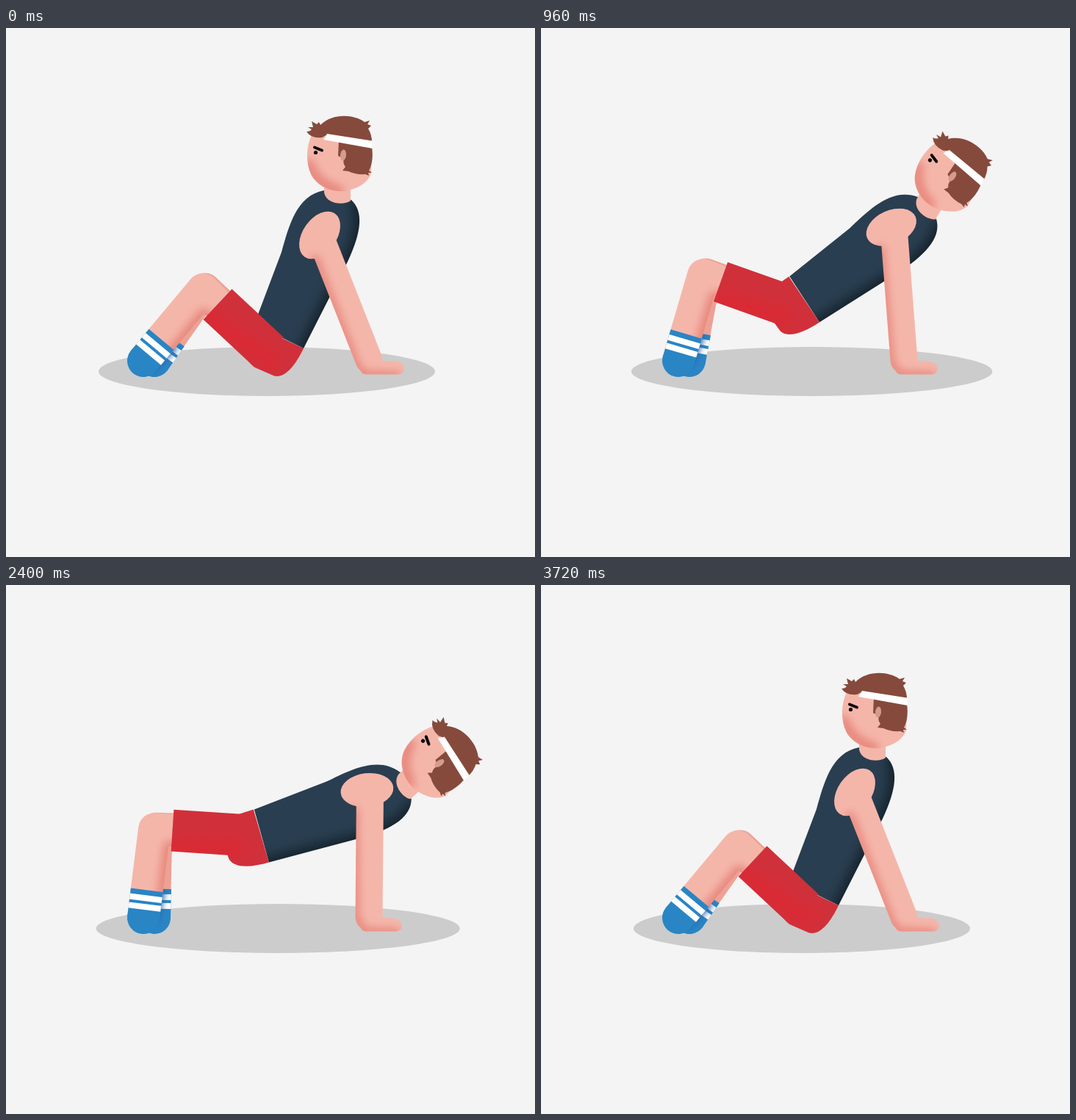
These frames come from a looping animation (720x720 px, 3800 ms). An HTML page with a canvas:

```html
<!DOCTYPE html>
<html>
<head>
<meta charset="utf-8">
<title>Bridge exercise</title>
<style>
html, body { margin: 0; width: 100%; height: 100%; overflow: hidden; background: #f4f4f4; }
canvas { display: block; }
</style>
</head>
<body>
<canvas id="stage" width="720" height="720"></canvas>
<script>
const LOOP = 3800, SWING = 1680, DEG = Math.PI / 180;
const SKIN = '#f5b6aa', BLUSH = '#e8877c', FAR_SKIN = '#eda195', BLUE = '#2985c4', NAVY = '#2a63a8';
const RED = '#d0303a', BRIGHT_RED = '#dc2833', HAIR = '#864a3c', WHITE = '#ffffff', INK = '#0c0808';
const screen2d = document.getElementById('stage').getContext('2d');
const layer = Object.assign(document.createElement('canvas'), { width: 720, height: 720 });
const g = layer.getContext('2d');

// Upper body in its sitting position; it turns as one piece around WAIST.
const WAIST = [405, 436];
const shirt = new Path2D('M338 403 L375 305 C385 270 395 228 433 221 L470 234 C487 250 484 278 465 318 L405 436Z');
const shirtBack = new Path2D('M486 240 C492 262 488 290 470 325 L410 444');
const neck = new Path2D('M433 205 V224 C436 240 460 242 469 235 V205Z');
const face = new Path2D('M416 146 C408 162 408 184 415 199 C423 215 442 224 461 222 C480 219 494 209 497 197 L498 150Z');
const jaw = new Path2D('M412 186 C418 204 432 216 452 222');
const hairTop = new Path2D('M436 146 L430 149 Q416 151 409 141 Q414 141 416 138 L411 135 L418 135 L416 127 L423 131 L426 128 L428 132 C444 116 473 117 488 128 L495 126 L492 131 L497 133 L493 137 Q498 145 498 156Z');
const hairBack = new Path2D('M453 152 L498 162 C500 176 498 187 494 194 L498 197 L493 197 L494 201 L489 199 Q476 200 466 195 L458 194 L462 189 Q458 184 460 178 L452 174Z');
const band = new Path2D('M437 144 L498 153.5 L499 164 L432 152Z');
const pelvis = new Path2D('M0 0 H-75 L-74 36 Q-60 52 -45 52 L-20 51 C-5 48 0 25 0 0Z');

const clamp = x => Math.min(1, Math.max(0, x));

// Symmetric cubic Bezier ease with handles of length a.
function ease(x, a) {
  let lo = 0, hi = 1, s = 0.5;
  for (let i = 0; i < 24; i++) {
    s = (lo + hi) / 2;
    const at = 3 * a * s * (1 - s) ** 2 + 3 * (1 - a) * s * s * (1 - s) + s ** 3;
    if (at < x) lo = s; else hi = s;
  }
  return s * s * (3 - 2 * s);
}

const swing = (t, up, down, a) => t < down
  ? ease(clamp((t - up) / SWING), a)
  : 1 - ease(clamp((t - down) / SWING), a);

const add = (p, q, k = 1) => [p[0] + q[0] * k, p[1] + q[1] * k];
const polar = angle => [Math.cos(angle), Math.sin(angle)];
function unit(from, to) {
  const x = to[0] - from[0], y = to[1] - from[1], d = Math.hypot(x, y);
  return [x / d, y / d];
}

function fill(path, color) {
  g.fillStyle = color;
  g.fill(path);
}

function stroke(path, width, color) {
  g.lineWidth = width;
  g.strokeStyle = color;
  g.stroke(path);
}

function line(points, width, color, cap = 'round') {
  const path = new Path2D();
  points.forEach(p => path.lineTo(...p));
  g.lineCap = cap;
  g.lineJoin = 'round';
  stroke(path, width, color);
}

function ellipse(x, y, rx, ry, angle, color) {
  g.fillStyle = color;
  g.beginPath();
  g.ellipse(x, y, rx, ry, angle, 0, 7);
  g.fill();
}

function at([x, y], angle, draw) {
  g.save();
  g.translate(x, y);
  g.rotate(angle);
  draw();
  g.restore();
}

// Draws a shape, then a blurred shade that stays inside it.
function part(base, shade, blur = 6) {
  g.clearRect(0, 0, 720, 720);
  base();
  if (shade) {
    g.save();
    g.globalCompositeOperation = 'source-atop';
    g.filter = `blur(${blur}px)`;
    shade();
    g.restore();
  }
  screen2d.drawImage(layer, 0, 0);
}

function sock(ankle, knee, height) {
  const up = unit(ankle, knee);
  at(ankle, Math.atan2(up[0], -up[1]), () => {
    ellipse(0, 0, 22, 22, 0, BLUE);
    g.fillRect(-22, -height, 44, height + 1);
    g.fillStyle = WHITE;
    g.fillRect(-22, 7 - height, 44, 8);
    g.fillRect(-22, 19 - height, 44, 8);
  });
}

function drawHead() {
  fill(hairBack, HAIR);
  ellipse(459, 173, 4, 7.5, 0.1, '#d59c8c');
  fill(hairTop, HAIR);
  fill(band, WHITE);
  line([[420, 162.5], [430, 166.5]], 4, INK);
  ellipse(421.5, 169.5, 2.6, 2.6, 0, INK);
}

function draw(t) {
  const u = swing(t, 120, 1800, 0.58), spread = swing(t, 0, 1760, 0.33);
  const mix = (from, to, bow = 0) => from + (to - from) * u + bow * u * (1 - u);

  const waist = [mix(405, 340, 26), mix(436, 360, 10)];
  const lean = mix(0, 60.5, 2) * DEG;
  const hem = [mix(288, 217, -32), mix(376, 329, -28)];
  const thighDir = polar(mix(43, -8.4, 9) * DEG);
  const thighDown = [-thighDir[1], thighDir[0]];
  const knee = [mix(268, 192, -35), mix(356, 333, -34)];
  const ankle = [187, 453], farAnkle = [202, 453], farKnee = add(knee, [3, -1]);
  const inBody = draw => at(waist, lean, () => { g.translate(-WAIST[0], -WAIST[1]); draw(); });
  const turned = (x, y, angle) => {
    const [c, s] = polar(angle);
    return add(waist, [x * c - y * s, x * s + y * c]);
  };

  screen2d.fillStyle = '#f4f4f4';
  screen2d.fillRect(0, 0, 720, 720);

  part(() => {
    const left = 126 - 5 * spread, right = 584 + 50 * spread;
    ellipse((left + right) / 2, 467.5, (right - left) / 2, 33.5, 0, '#cccccc');
  });

  // Legs
  const shin = unit(knee, ankle), calf = [shin[1], -shin[0]];
  const bend = add(add(knee, shin, 23), unit(knee, hem), 23);
  part(() => line([farAnkle, farKnee, add(hem, [3, -2])], 43, FAR_SKIN));
  part(
    () => sock(farAnkle, farKnee, 39.5),
    () => line([add(ankle, calf, 16), add(add(ankle, calf, 20), shin, -40)], 10, NAVY),
    4
  );
  part(
    () => line([add(ankle, shin, -20), knee, hem], 44, SKIN),
    () => line([add(ankle, calf, 23), bend, add(bend, thighDir, 30)], 17, BLUSH)
  );
  part(() => sock(ankle, knee, 38));

  // Torso and head
  part(
    () => inBody(() => fill(shirt, '#293e50')),
    () => inBody(() => stroke(shirtBack, 30, '#14212a')),
    8
  );
  part(() => inBody(() => fill(neck, SKIN)));
  part(
    () => inBody(() => fill(face, SKIN)),
    () => inBody(() => stroke(jaw, 16, BLUSH)),
    6
  );
  part(() => inBody(drawHead));

  // Shorts
  const hip = lean + 25.5 * DEG;
  part(
    () => {
      at(waist, hip, () => fill(pelvis, RED));
      line([hem, add(hem, thighDir, 96)], 57, RED, 'butt');
    },
    () => line([add(hem, thighDown, 22), turned(-30, 34, hip)], 20, BRIGHT_RED),
    9
  );

  // Arm
  const shoulder = turned(22 - 8 * u, -154 - 14 * u, lean);
  const wrist = [494, 452], armDir = unit(shoulder, wrist);
  const outer = [-armDir[1], armDir[0]];
  part(
    () => {
      line([add(shoulder, [4, 10]), wrist], 37, SKIN);
      line([[490, 463.5], [mix(534, 530), 463.5]], 16, SKIN);
      line([[512, 458], [mix(533, 526), 458.5]], 10, SKIN);
      ellipse(...shoulder, 36, 23, lean - 55 * DEG, SKIN);
    },
    () => line([add(add(shoulder, armDir, 28), outer, 18), add(wrist, outer, 19), [486, 472], [532, 474]], 12, BLUSH),
    6
  );
}

function frame() {
  const t = performance.now() % LOOP;
  draw(Math.floor(t / 40) * 40);
  requestAnimationFrame(frame);
}
frame();
</script>
</body>
</html>
```
